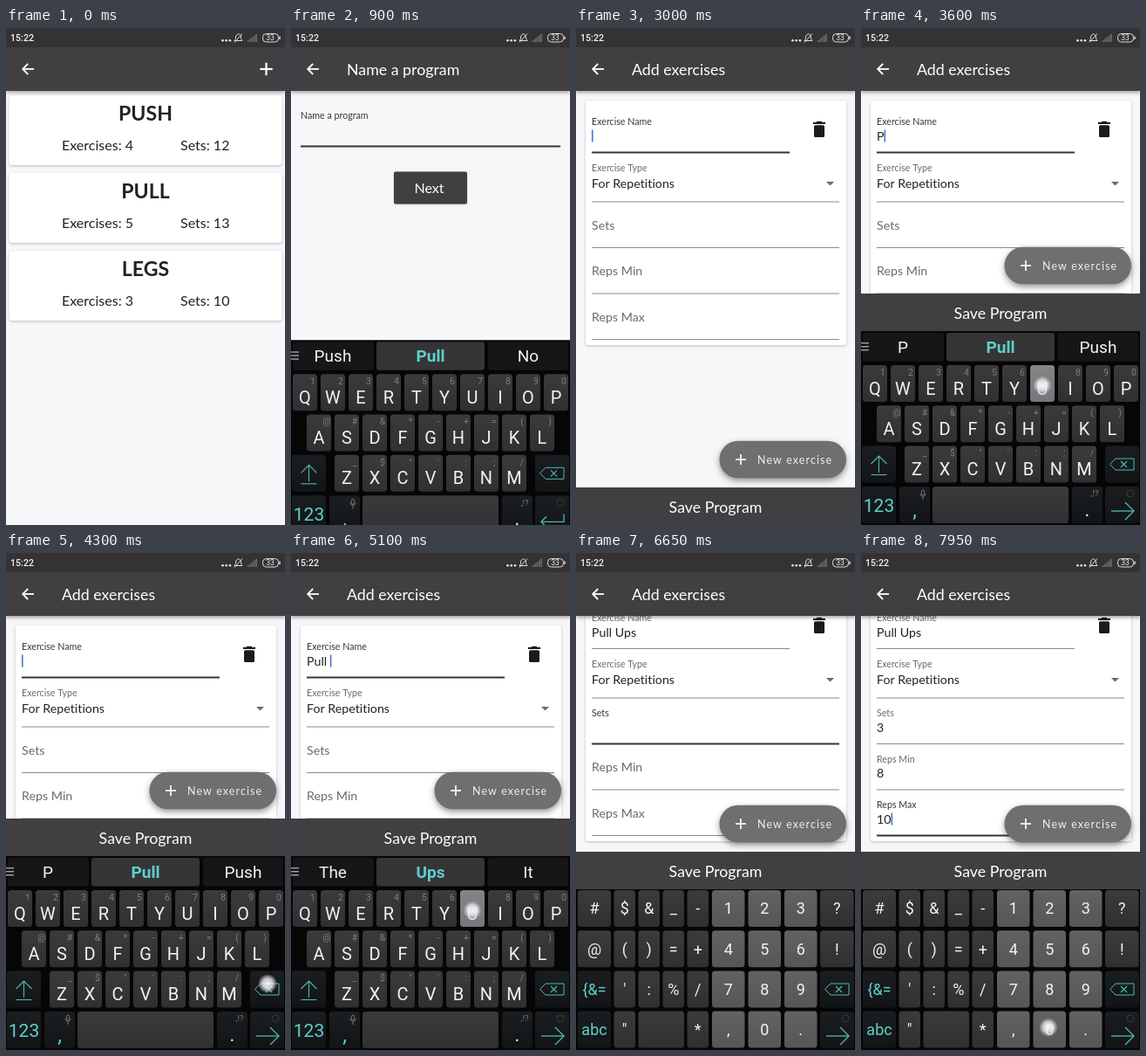
Write an HTML page with a canvas that moves like this. It is 320x569 px and loops after 8 s.

```html
<!DOCTYPE html>
<html lang="en">
<head>
<meta charset="utf-8">
<title>Workout planner</title>
<style>
html, body { margin: 0; width: 100%; height: 100%; overflow: hidden; background: #f7f6f8; }
canvas { display: block; width: 100%; height: 100%; }
</style>
</head>
<body>
<canvas id="stage"></canvas>
<script>
const W = 320, H = 569, LOOP = 8000;
const BAR = '#413f42', PAGE = '#f7f6f8', TEAL = '#5fd0cb', ICON = '#4fbab5', INK = '#222', GREY = '#6c6b6d';
const LATO = 'Lato, sans-serif', ROBOTO = 'Roboto, sans-serif';
const scale = Math.max(1, window.devicePixelRatio || 1);

function sized(c) {
  c.width = W * scale;
  c.height = H * scale;
  return c.getContext('2d');
}
const stage = sized(document.getElementById('stage'));
const layer = sized(document.createElement('canvas'));
let g = stage, t = 0;

// Timeline: [time, value] tracks hold each value until the next one
const programText = [[0, ''], [1150, 'Pull ']];
const exerciseText = [[0, ''], [3450, 'P'], [3650, 'Pu'], [4100, 'P'], [4290, ''],
  [4650, 'Pull '], [5150, 'Pull U'], [5300, 'Pull Up'], [5450, 'Pull Ups']];
const setsText = [[0, ''], [6850, '3']];
const minText = [[0, ''], [7230, '8']];
const maxText = [[0, ''], [7670, '1'], [7910, '10']];
const focus = [[0, ''], [350, 'program'], [1700, ''], [2870, 'name'], [5950, 'sets'], [7050, 'min'], [7410, 'max']];
const hints = [[0, 'Push Pull No'], [1150, 'The Ups It'], [2600, 'Push Pull No'], [3450, 'P Pull Push'],
  [3650, 'Pu Pull Push'], [4100, 'P Pull Push'], [4400, 'Push Pull No'], [4650, 'The Ups It'],
  [5150, 'U Ups Up'], [5300, 'Up Ups Upset'], [5450, 'Ups Ups Upset']];
const changes = [programText, exerciseText, setsText, minText, maxText, focus]
  .flat().map(e => e[0]).sort((a, b) => a - b);

// Finger taps: start, x, y
const taps = [[50, 298, 47], [1080, 160, 366], [1480, 160, 183], [2820, 50, 123],
  [3380, 304, 409], [3590, 208, 409], [4040, 300, 495], [4250, 300, 493], [4580, 160, 366],
  [5050, 208, 409], [5240, 304, 409], [5390, 64, 455], [5800, 300, 548],
  [6790, 257, 407], [6990, 300, 548], [7180, 215, 499], [7350, 300, 548],
  [7610, 174, 407], [7870, 215, 543]];
const TAP_MS = 130;

const value = track => track.filter(e => e[0] <= t).pop()[1];
const ramp = (a, b) => Math.min(1, Math.max(0, (t - a) / (b - a)));
const easeOut = u => 1 - (1 - u) * (1 - u);
const mix = (a, b, u) => a + (b - a) * u;
const activeTaps = () => taps.filter(([s]) => t >= s && t < s + TAP_MS);

function rect(x, y, w, h, fill, r = 0) {
  g.fillStyle = fill;
  g.beginPath();
  g.roundRect(x, y, w, h, r);
  g.fill();
}

function shadowed(blur, dy, alpha, draw) {
  g.save();
  g.shadowColor = `rgba(0,0,0,${alpha})`;
  g.shadowBlur = blur * scale;
  g.shadowOffsetY = dy * scale;
  draw();
  g.restore();
}

function line(points, color, width, closed) {
  g.strokeStyle = color;
  g.lineWidth = width;
  g.beginPath();
  for (let i = 0; i < points.length; i += 2) g.lineTo(points[i], points[i + 1]);
  if (closed) g.closePath();
  g.stroke();
}

function poly(points, fill) {
  g.fillStyle = fill;
  g.beginPath();
  for (let i = 0; i < points.length; i += 2) g.lineTo(points[i], points[i + 1]);
  g.fill();
}

// y is the middle of the capitals; a non-zero gap keeps ligatures off
function text(s, x, y, size, color, { align = 'left', weight = 400, font = LATO, gap = 0.01 } = {}) {
  g.font = `${weight} ${size}px ${font}`;
  g.textAlign = align;
  g.letterSpacing = gap + 'px';
  g.fillStyle = color;
  g.fillText(s, x, y + size * 0.36);
}

const plus = (x, y, r, color, w) => {
  line([x - r, y, x + r, y], color, w);
  line([x, y - r, x, y + r], color, w);
};

function statusBar() {
  rect(0, 0, W, 22, '#343235');
  text('15:22', 5, 11.5, 10.6, '#f2f2f2', { weight: 500, font: ROBOTO });
  for (const x of [248.5, 252.7, 256.9]) rect(x - 1.3, 13, 2.6, 2.6, '#eee', 1.3);
  g.lineWidth = 1;
  g.strokeStyle = '#ddd';
  g.beginPath();
  g.moveTo(262, 14.5);
  g.lineTo(263.4, 12.5);
  g.bezierCurveTo(263, 5, 270, 5, 269.6, 12.5);
  g.lineTo(271, 14.5);
  g.closePath();
  g.stroke();
  line([262, 16.5, 271, 6.5], '#ddd', 1);
  for (let i = 0; i < 5; i++) rect(277 + i * 2.3, 14 - i * 1.8, 1.6, 2 + i * 1.8, '#6f6d70');
  g.strokeStyle = '#ddd';
  g.beginPath();
  g.roundRect(294.5, 6.5, 18, 9.5, 4);
  g.stroke();
  rect(313.3, 9.5, 1.4, 3.5, '#ddd');
  text('33', 303, 11.4, 8.5, '#eee', { align: 'center', font: ROBOTO });
}

function appBar(title) {
  shadowed(4, 2, 0.35, () => rect(0, 22, W, 50, BAR));
  line([32, 47, 19.5, 47], '#fff', 1.8);
  line([25.2, 41, 19.2, 47, 25.2, 53], '#fff', 1.8);
  text(title, 64, 48, 17.78, '#fff');
}

function card(x, y, w, h) {
  shadowed(3, 1, 0.24, () => rect(x, y, w, h, '#fff', 3.5));
}

function cursor(x, y) {
  const last = changes.filter(c => c <= t).pop();
  if ((t - last) % 1000 < 500) rect(x, y - 7, 1.6, 14, '#4a72cf');
}

function field(id, label, x, x2, y, content, floatStart) {
  const focused = value(focus) === id;
  const up = easeOut(ramp(floatStart, floatStart + 120));
  text(label, x, mix(y - 25.4, y - 34.7, up), mix(14.22, 10.67, up), focused ? '#38373a' : GREY);
  text(content, x, y - 18.4, 14.22, INK);
  if (focused) cursor(x + g.measureText(content).width, y - 18.5);
  rect(x, focused ? y - 0.4 : y, x2 - x, focused ? 1.8 : 1, focused ? '#363538' : '#8b8a8c');
}

function listPage() {
  rect(0, 0, W, H, PAGE);
  [['PUSH', 4, 12], ['PULL', 5, 13], ['LEGS', 3, 10]].forEach(([name, n, sets], i) => {
    const y = 77 + i * 89;
    card(3.5, y, 313, 80);
    text(name, 160, y + 20.5, 23.1, INK, { align: 'center', weight: 700 });
    text('Exercises: ' + n, 64, y + 57.5, 16, INK);
    text('Sets: ' + sets, 200, y + 57.5, 16, INK);
  });
  appBar('');
  plus(298.5, 47, 7.2, '#fff', 2.2);
  statusBar();
}

function programPage() {
  rect(0, 0, W, H, PAGE);
  field('program', 'Name a program', 11, 309, 135, value(programText), 350);
  shadowed(2, 0.5, 0.25, () => rect(118, 164.5, 84, 37, BAR, 2));
  text('Next', 158.5, 183.5, 16, '#fff', { align: 'center' });
  appBar('Name a program');
  statusBar();
}

function trash(y) {
  rect(273, y - 4.7, 12, 13.8, '#1b1b1b', 1.5);
  rect(272, y - 8.2, 14, 2.2, '#1b1b1b');
  rect(276, y - 9.2, 6, 1.5, '#1b1b1b');
}

function exercisePage(bottom) {
  rect(0, 0, W, H, PAGE);
  g.save();
  g.translate(0, -33 * easeOut(ramp(5950, 6130)));
  card(11, 83, 299, 280);
  field('name', 'Exercise Name', 18, 245, 142, value(exerciseText), 2870);
  trash(116);
  text('Exercise Type', 18, 160, 10.67, GREY);
  text('For Repetitions', 18, 178, 14.22, INK);
  poly([287, 176, 296, 176, 291.5, 180.6], '#6a696b');
  rect(18, 198.5, 284, 1, '#8b8a8c');
  field('sets', 'Sets', 18, 302, 251, value(setsText), 5950);
  field('min', 'Reps Min', 18, 302, 303.5, value(minText), 7050);
  field('max', 'Reps Max', 18, 302, 356, value(maxText), 7410);
  g.restore();

  const fab = bottom - 75;
  shadowed(7, 3, 0.42, () => rect(164.5, fab - 21.3, 145.5, 42.6, '#6f6e70', 21.3));
  plus(189, fab, 6, '#f4f4f4', 1.8);
  text('New exercise', 208, fab + 0.5, 12.44, '#f0f0f0', { gap: 1.11 });
  rect(0, bottom - 43, W, 43.5, BAR);
  text('Save Program', 160, bottom - 20.5, 17.78, '#fff', { align: 'center' });
  appBar('Add exercises');
  statusBar();
}

// kind: 0 letter, 1 command, 2 digit
function key(x, y, w, label, { kind = 0, h = 42, size = 20, sub = '', dy = 0, color } = {}) {
  const hit = kind === 0 &&
    activeTaps().some(([, px, py]) => px >= x && px <= x + w && py >= y && py <= y + h);
  const [top, low] = hit ? ['#858487', '#77767a']
    : [['#3b3a3d', '#302f32'], ['#1b1e20', '#121416'], ['#626164', '#565558']][kind];
  const fill = g.createLinearGradient(0, y, 0, y + h);
  fill.addColorStop(0, top);
  fill.addColorStop(1, low);
  rect(x, y, w, h, fill, 3.5);
  text(label, x + w / 2, y + h / 2 + dy, size, color || (kind === 1 ? TEAL : '#f3f3f3'),
    { align: 'center', font: ROBOTO });
  if (sub) text(sub, x + w - 5, y + 8, 10.5, '#7d7c80', { align: 'center', font: ROBOTO });
}

function backspace() {
  key(280, 478.5, 39, '', { kind: 1 });
  line([285.5, 499.5, 292, 493, 313, 493, 313, 506, 292, 506], ICON, 1, true);
  line([298, 496, 305, 503], ICON, 1.1);
  line([305, 496, 298, 503], ICON, 1.1);
}

function enter(newline) {
  key(280, 525, 39, '', { kind: 1 });
  g.strokeStyle = '#3a393c';
  g.lineWidth = 1;
  g.beginPath();
  g.arc(309, 533, 4, 0, 7);
  g.stroke();
  if (newline) {
    line([313, 546, 313, 555, 287, 555], ICON, 1.3);
    line([293, 549, 287, 555, 293, 561], ICON, 1.3);
  } else {
    line([287, 553, 313, 553], ICON, 1.3);
    line([303, 543, 313, 553, 303, 563], ICON, 1.3);
  }
}

function letterKeys() {
  rect(0, 347, W, 222, '#060607');
  const words = value(hints).split(' ');
  [[2, 93, 48], [98, 124, 160], [226, 92, 272]].forEach(([x, w, cx], i) => {
    const mid = i === 1;
    rect(x, 349, w, 32.5, mid ? '#353437' : '#161618', 3);
    text(words[i], cx, 365.2, 19, mid ? TEAL : '#f3f3f3',
      { align: 'center', font: ROBOTO, weight: mid ? 700 : 400 });
  });
  for (const y of [360, 364, 368]) rect(0, y, 9, 1.4, '#a5a4a7');

  const rows = [['QWERTYUIOP', '1234567890', 2], ['ASDFGHJKL', '@#&*-+=()', 18], ['ZXCVBNM', '_$"\':;/', 50]];
  rows.forEach(([letters, subs, x], r) => {
    [...letters].forEach((c, i) =>
      key(x + i * 32, 386 + r * 46.2, 28, c, { sub: subs[i], dy: 5.5 }));
  });
  key(1, 478.5, 39, '', { kind: 1 });
  line([20.5, 509, 20.5, 490], ICON, 1.1);
  line([11.5, 499, 20.5, 490, 29.5, 499], ICON, 1.1);
  line([11.5, 511.5, 29.5, 511.5], ICON, 1.1);
  backspace();
  key(1, 525, 39, '123', { kind: 1, size: 21 });
  key(44, 525, 35, ',', { kind: 1, size: 24, dy: 5 });
  g.strokeStyle = '#77767a';
  g.lineWidth = 1;
  g.beginPath();
  g.roundRect(69.5, 529, 3, 6, 1.5);
  g.moveTo(67.5, 533);
  g.quadraticCurveTo(71, 540, 74.5, 533);
  g.moveTo(71, 537);
  g.lineTo(71, 540);
  g.stroke();
  key(82, 525, 156, '');
  key(242, 525, 35, '.', { kind: 1, size: 22, dy: 5, color: '#f3f3f3' });
  text(',!?', 268, 533, 9.5, '#7d7c80', { align: 'center', font: ROBOTO });
  enter(t < 2600);
}

function numberKeys() {
  rect(0, 385, W, 184, '#060607');
  const columns = [[2, 38], [43.5, 24.5], [71.5, 24.5], [99.5, 24.5], [127.5, 24.5],
    [156, 37.5], [197.5, 37.5], [239, 37.5], [280, 38.5]];
  const rows = ['# $ & _ - 1 2 3 ?', '@ ( ) = + 4 5 6 !', "{&= ' : % / 7 8 9", 'abc " ~ ~ * , 0 .'];
  rows.forEach((row, r) => row.split(' ').forEach((c, i) => {
    if (c === '~') return;
    const kind = c.length > 1 ? 1 : i > 4 && i < 8 ? 2 : 0;
    key(columns[i][0], 386 + r * 46.2, columns[i][1], c, { kind, size: 18 });
  }));
  key(71.5, 524.6, 52.5, '');
  backspace();
  enter(false);
}

function touches() {
  for (const [, x, y] of activeTaps()) {
    const glow = g.createRadialGradient(x, y, 0, x, y, 11);
    glow.addColorStop(0, 'rgba(255,255,255,.95)');
    glow.addColorStop(0.55, 'rgba(235,235,238,.8)');
    glow.addColorStop(0.8, 'rgba(190,190,195,.5)');
    glow.addColorStop(1, 'rgba(160,160,165,0)');
    rect(x - 11, y - 11, 22, 22, glow);
  }
}

// New page fades in while it rises
function enterPage(start, draw) {
  const u = ramp(start, start + 280);
  if (u === 1) return draw();
  g = layer;
  draw();
  g = stage;
  g.globalAlpha = u * u;
  g.drawImage(layer.canvas, 0, 142 * (1 - u) ** 3, W, H);
  g.globalAlpha = 1;
}

function keyboardHeight() {
  if (t >= 5950) return 184;
  if (t >= 2600) return 222 * easeOut(ramp(3040, 3220));
  if (t >= 2100) return 222 * (1 - ramp(2100, 2420) ** 2);
  return 222 * easeOut(ramp(650, 970));
}

function frame() {
  t = performance.now() % LOOP;
  stage.setTransform(scale, 0, 0, scale, 0, 0);
  layer.setTransform(scale, 0, 0, scale, 0, 0);
  const kb = keyboardHeight();

  if (t < 400) listPage();
  else if (t < 1930) programPage();
  if (t >= 120 && t < 400) enterPage(120, programPage);
  if (t >= 1650) enterPage(1650, () => exercisePage(H - kb));

  if (kb > 0) {
    g.save();
    if (t < 5950) g.translate(0, 222 - kb);
    (t < 5950 ? letterKeys : numberKeys)();
    g.restore();
  }
  touches();
  requestAnimationFrame(frame);
}
frame();
</script>
</body>
</html>
```
